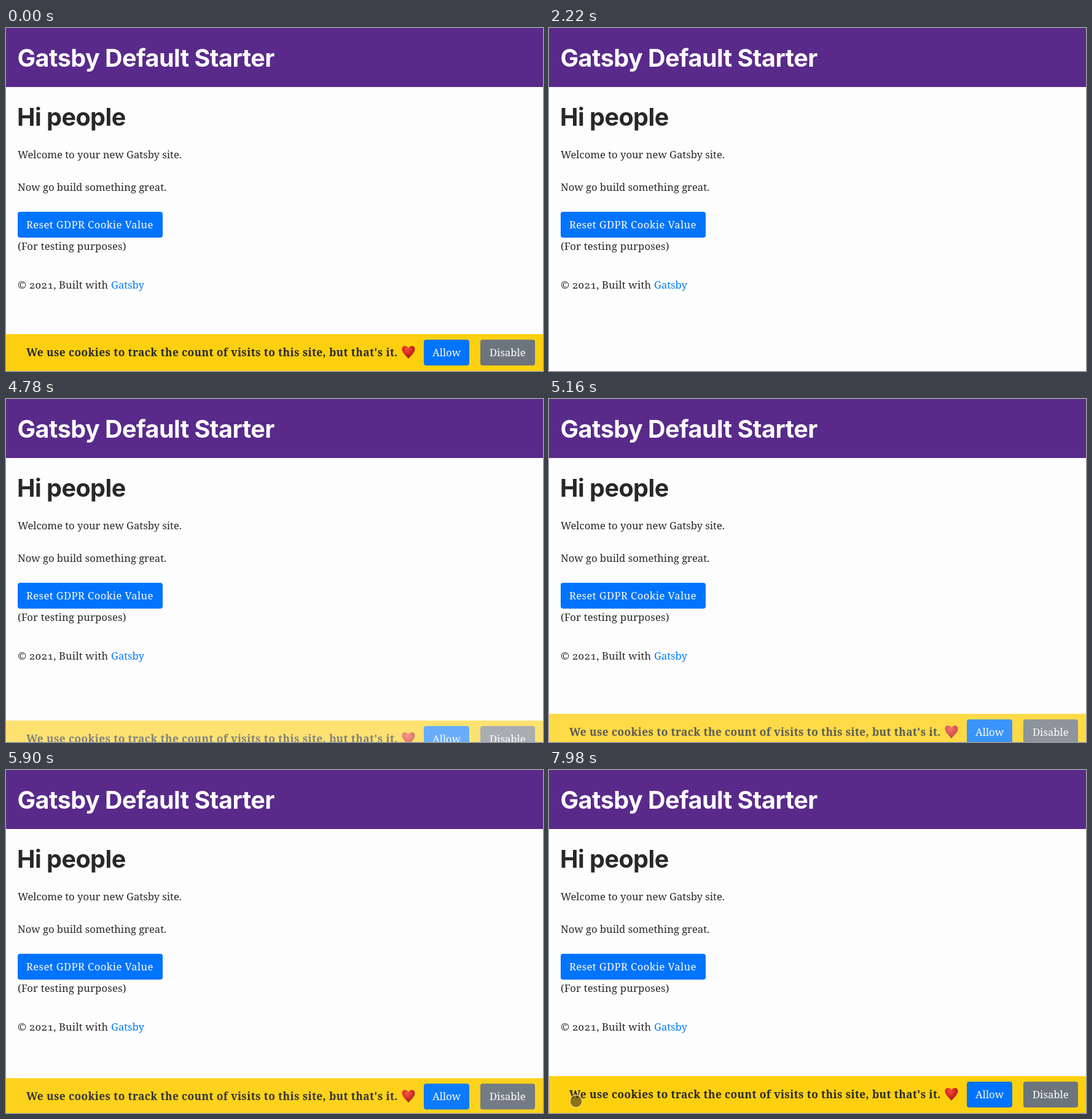
An HTML page that plays this animation: 874 px wide and 558 px high, repeating every 8 s.

```html
<!DOCTYPE html>
<html lang="en">
<head>
<meta charset="utf-8">
<title>Cookie banner</title>
<style>
  html, body { margin: 0; width: 100%; height: 100%; overflow: hidden; background: #fdfdfd; }
  svg { display: block; width: 874px; height: 558px; }
  text { font: 16.65px "Noto Serif", Georgia, serif; font-variant-numeric: oldstyle-nums; fill: #282828; white-space: pre; }
  .title { font: 700 39.5px Inter, "Open Sans", sans-serif; letter-spacing: -.52px; }
  .notice { font-weight: 700; font-size: 17.3px; letter-spacing: .4px; }
  .light { fill: #fdfdfd; }
  .wide { letter-spacing: .2px; }
  .wider { letter-spacing: .4px; }
  .link { fill: #007bff; }
  .blue { fill: #0074fc; }
  .grey { fill: #6c757d; }
</style>
</head>
<body>
<svg viewBox="0 0 874 558">
  <defs>
    <radialGradient id="red" cx=".4" cy=".25" r=".8">
      <stop offset="0" stop-color="#f0503c"/>
      <stop offset=".5" stop-color="#d52820"/>
      <stop offset="1" stop-color="#8c1410"/>
    </radialGradient>
  </defs>

  <g id="page">
    <rect width="874" height="96" fill="#592a8a"/>
    <text class="title light" x="18.5" y="63">Gatsby Default Starter</text>
    <text class="title" x="18" y="159">Hi people</text>
    <text x="19" y="212">Welcome to your new Gatsby site.</text>
    <text x="19" y="265">Now go build something great.</text>
    <rect class="blue" x="19" y="299" width="236" height="42" rx="4"/>
    <text class="light wider" x="33" y="326">Reset GDPR Cookie Value</text>
    <text class="wide" x="19" y="361">(For testing purposes)</text>
    <text class="wide" x="19" y="424">© 2021, Built with</text>
    <text class="link" x="171" y="424">Gatsby</text>
  </g>

  <g id="banner">
    <rect y="498" width="874" height="60" fill="#fdd00f"/>
    <text class="notice" x="33" y="534">We use cookies to track the count of visits to this site, but that's it.</text>
    <path fill="url(#red)" d="M655 538C651 533 644.5 528 644.5 522.5C644.5 516 652 515.5 655 520.5C658 515.5 665.5 516 665.5 522.5C665.5 528 659 533 655 538Z"/>
    <rect class="blue" x="680" y="507" width="74" height="42" rx="4"/>
    <text class="light" x="694" y="534">Allow</text>
    <rect class="grey" x="772" y="507" width="89" height="42" rx="4"/>
    <text class="light" x="787" y="534">Disable</text>
  </g>

  <circle id="pointer" cx="44" cy="539" r="10" fill="#463a20" fill-opacity=".62" stroke="#ffe07a" stroke-opacity=".8" stroke-width="1.5"/>
</svg>
<script>
  const LOOP = 8000;
  const RELOAD = 20, LOADED = 2220;
  const SLIDE = { start: 3770, length: 3000, rise: 60 };
  const POINTER = { start: 7880, end: 7980, from: -56 };

  const [page, banner, pointer] = ["page", "banner", "pointer"].map(id => document.getElementById(id));
  const clamp = v => Math.min(1, Math.max(0, v));

  // Solves the standard CSS "ease" curve, cubic-bezier(.25, .1, .25, 1).
  function ease(x) {
    const bezier = (s, a, b) => 3 * a * s * (1 - s) ** 2 + 3 * b * s * s * (1 - s) + s ** 3;
    let lo = 0, hi = 1;
    for (let i = 0; i < 24; i++) {
      const mid = (lo + hi) / 2;
      if (bezier(mid, .25, .25) < x) lo = mid; else hi = mid;
    }
    return bezier((lo + hi) / 2, .1, 1);
  }

  function draw(t) {
    page.style.visibility = t < RELOAD || t >= LOADED ? "visible" : "hidden";

    const shown = t < RELOAD ? 1 : ease(clamp((t - SLIDE.start) / SLIDE.length));
    banner.setAttribute("opacity", t >= RELOAD && t < SLIDE.start ? 0 : shown);
    banner.setAttribute("transform", `translate(0 ${SLIDE.rise * (1 - shown)})`);

    const moved = clamp((t - POINTER.start) / (POINTER.end - POINTER.start));
    pointer.style.visibility = t < POINTER.start ? "hidden" : "visible";
    pointer.setAttribute("transform", `translate(${POINTER.from * (1 - moved)} 0)`);
  }

  const origin = performance.now();
  function tick() {
    draw((performance.now() - origin) % LOOP);
    requestAnimationFrame(tick);
  }
  tick();
</script>
</body>
</html>
```
